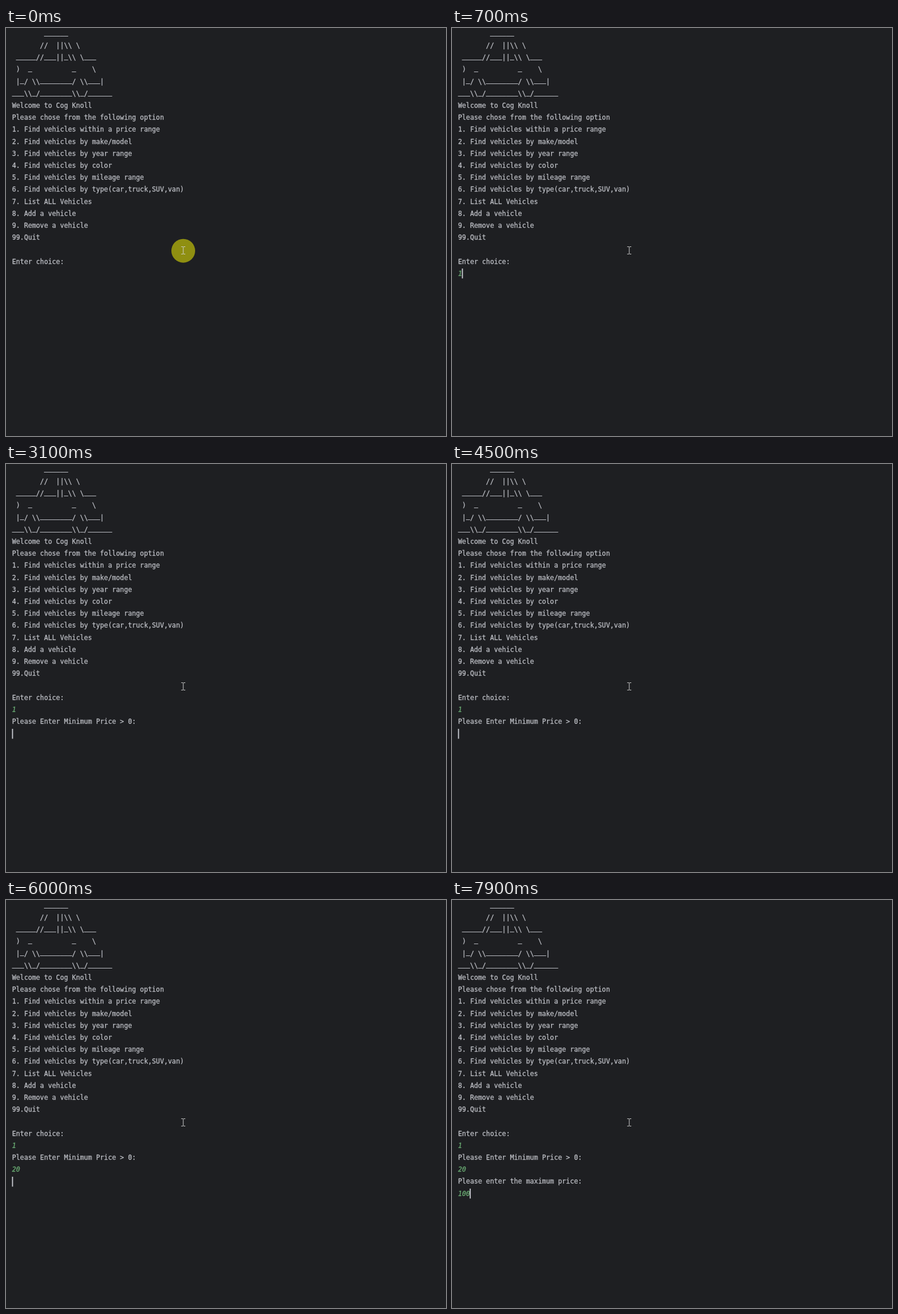
An HTML page with a canvas that plays this animation: 777x721 px, repeating every 8 s.

```html
<!DOCTYPE html>
<html lang="en">
<head>
<meta charset="utf-8">
<title>Console session</title>
<style>
html, body { margin: 0; width: 100%; height: 100%; overflow: hidden; background: #1e1f22; }
canvas { display: block; }
</style>
</head>
<body>
<canvas id="stage" width="777" height="721"></canvas>
<script>
const ctx = document.getElementById('stage').getContext('2d');
const LOOP = 8000, LEFT = 10.7, ADVANCE = 7.06, LINE = 21.2;
const FONT = '11.73px "DejaVu Sans Mono", monospace';

const screen = String.raw`        ______
       //  ||\\ \
 _____//___||_\\ \___
 )  _          _    \
 |_/ \\________/ \\___|
___\\_/________\\_/______
Welcome to Cog Knoll
Please chose from the following option
1. Find vehicles within a price range
2. Find vehicles by make/model
3. Find vehicles by year range
4. Find vehicles by color
5. Find vehicles by mileage range
6. Find vehicles by type(car,truck,SUV,van)
7. List ALL Vehicles
8. Add a vehicle
9. Remove a vehicle
99.Quit

Enter choice:`.split('\n');

const prompts = [
  { at: 3100, row: 21, text: 'Please Enter Minimum Price > 0:' },
  { at: 6200, row: 23, text: 'Please enter the maximum price:' },
];

// One time per typed character
const inputs = [
  { row: 20, text: '1', times: [700] },
  { row: 22, text: '20', times: [5500, 5600] },
  { row: 24, text: '100', times: [7200, 7400, 7600] },
];

// [time, row, column]; no row means the caret is hidden
const caretSteps = [
  [0], [300, 20, 0], [700, 20, 1], [1500], [2000, 20, 1], [2500],
  [2900, 21, 0], [3100, 22, 0], [3900], [4500, 22, 0], [5000],
  [5500, 22, 1], [5600, 22, 2], [6000, 23, 0], [6200, 24, 0], [7100],
  [7200, 24, 1], [7400, 24, 2], [7600, 24, 3],
];

const baseline = row => 13.8 + row * LINE;

// A thin outline gives the strokes a medium weight
function drawLine(text, row, color = '#bcbec4', style = '') {
  ctx.font = style + FONT;
  ctx.fillStyle = ctx.strokeStyle = color;
  ctx.lineWidth = 0.3;
  [...text].forEach((ch, i) => {
    const x = LEFT + i * ADVANCE;
    const y = baseline(row) - (ch === '_' ? 2.2 : 0);
    ctx.fillText(ch, x, y);
    ctx.strokeText(ch, x, y);
  });
}

function drawCaret(t) {
  const [, row, col] = caretSteps.filter(step => step[0] <= t).pop();
  if (row === undefined) return;
  ctx.fillStyle = '#ced0d6';
  ctx.fillRect(10.6 + 6.9 * col, Math.round(baseline(row) - 12.6), 1.8, 17.5);
}

function drawPointer(t) {
  const fade = Math.max(0, 1 - Math.floor(t / 100) / 4);
  ctx.fillStyle = `rgba(255, 255, 0, ${0.5 * fade})`;
  ctx.beginPath();
  ctx.arc(313, 393.7, 21, 0, 2 * Math.PI);
  ctx.fill();

  ctx.fillStyle = '#d4d4d4';
  ctx.fillRect(312.5, 387, 1, 12);
  for (const y of [386, 399]) {
    ctx.fillRect(309.5, y, 3, 1);
    ctx.fillRect(313.5, y, 3, 1);
  }
}

function draw(now) {
  const t = now % LOOP;
  ctx.fillStyle = '#1e1f22';
  ctx.fillRect(0, 0, 777, 721);
  screen.forEach((text, row) => drawLine(text, row));
  for (const p of prompts) if (t >= p.at) drawLine(p.text, p.row);
  for (const { row, text, times } of inputs) {
    const count = times.filter(at => at <= t).length;
    drawLine(text.slice(0, count), row, '#6aab73', 'italic ');
  }
  drawCaret(t);
  drawPointer(t);
}

let start;
function tick(now) {
  start ??= now;
  draw(now - start);
  requestAnimationFrame(tick);
}
requestAnimationFrame(tick);
</script>
</body>
</html>
```
